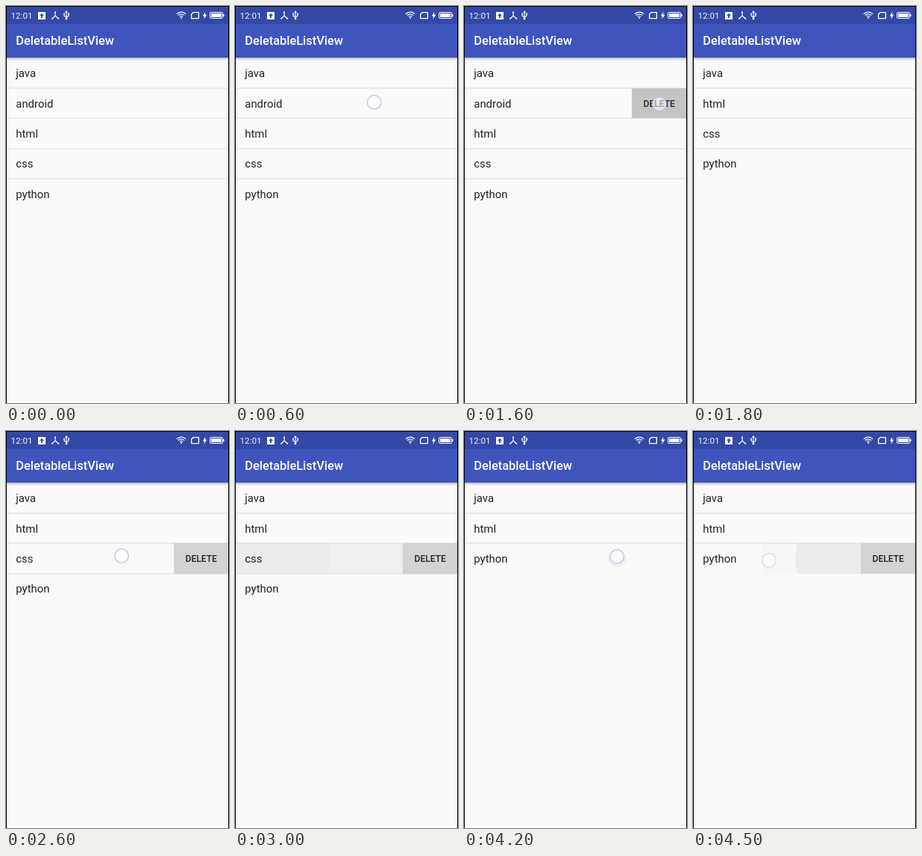
These frames come from a looping animation (299 by 531 pixels, 8 s). An HTML page with a canvas:

```html
<!DOCTYPE html>
<html lang="en">
<head>
<meta charset="utf-8">
<title>Deletable list</title>
<style>
html, body { margin: 0; width: 100%; height: 100%; overflow: hidden; background: #000; }
canvas { display: block; width: 299px; height: 531px; }
</style>
</head>
<body>
<canvas id="stage"></canvas>
<script>
const W = 299, H = 531, LOOP = 8000, STEP = 100;
const ROW_TOP = 69.3, ROW_H = 40.4, BUTTON_X = 225;
const BAR = '#3f55be', STATUS = '#3448a6', PAGE = '#fafafa', INK = '#222';

const canvas = document.getElementById('stage');
const ctx = canvas.getContext('2d');
const scale = window.devicePixelRatio || 1;
canvas.width = W * scale;
canvas.height = H * scale;

// Each swipe opens a button between two times; a press then removes the row.
const swipes = [
  { row: 1, start: 500, open: 700, end: 800, from: [205, 129], to: [150, 128], press: 1600 },
  { row: 2, start: 2400, open: 2600, end: 2800, from: [205, 165], to: [105, 169], press: 3300, hold: true },
  { row: 2, start: 4200, open: 4500, end: 8000, from: [205, 168], to: [102, 173], stop: 4500, ripple: true }
];

const rowTop = i => Math.round(ROW_TOP + i * ROW_H);
const clamp = v => Math.max(0, Math.min(1, v));
const mix = (a, b, k) => a + (b - a) * k;

function rect(x, y, w, h, fill) {
  ctx.fillStyle = fill;
  ctx.fillRect(x, y, w, h);
}

function text(str, x, y, size, weight, fill) {
  ctx.font = `${weight} ${size}px Roboto, sans-serif`;
  ctx.fillStyle = fill;
  ctx.fillText(str, x, y);
}

function path(points, close) {
  ctx.beginPath();
  points.forEach(([x, y], i) => i ? ctx.lineTo(x, y) : ctx.moveTo(x, y));
  if (close) ctx.closePath();
}

function stroke(points, width, close) {
  path(points, close);
  ctx.lineWidth = width;
  ctx.stroke();
}

function dot(x, y, r) {
  ctx.beginPath();
  ctx.arc(x, y, r, 0, Math.PI * 2);
  ctx.fill();
}

function statusIcons() {
  ctx.strokeStyle = ctx.fillStyle = '#fff';
  ctx.lineJoin = 'round';

  // Upload box
  ctx.fillRect(43, 8, 10, 10);
  ctx.fillStyle = STATUS;
  path([[48, 9.8], [51, 13], [49, 13], [49, 16], [47, 16], [47, 13], [45, 13]], true);
  ctx.fill();

  // Three-way link
  ctx.fillStyle = '#fff';
  stroke([[66, 8], [66, 13], [62, 17]], 1.2);
  stroke([[66, 13], [70.5, 17]], 1.2);
  dot(66, 8.3, 1);
  dot(62, 16.8, 1);
  dot(70.3, 16.8, 1);

  // USB
  stroke([[81, 8], [81, 17]], 1.2);
  stroke([[78, 10], [78, 13], [81, 15], [84, 13], [84, 10]], 1.1);
  path([[81, 6], [83, 9], [79, 9]], true);
  ctx.fill();
  dot(81, 17, 1.4);
  dot(78, 10.5, 1);
  ctx.fillRect(83, 9.5, 2, 2);

  // Wireless
  ctx.lineWidth = 1.2;
  for (const r of [3, 5.7, 8.4]) {
    ctx.beginPath();
    ctx.arc(235, 16.5, r, -Math.PI * 0.76, -Math.PI * 0.24);
    ctx.stroke();
  }
  dot(235, 16, 1.1);

  // Card, bolt, battery
  stroke([[251, 8.7], [258.4, 8.7], [258.4, 16.6], [248.6, 16.6], [248.6, 11]], 1.3, true);
  path([[267.5, 7.5], [263.8, 13.4], [266.2, 13.4], [265.2, 18], [269.4, 11.6], [266.9, 11.6]], true);
  ctx.fill();
  ctx.lineWidth = 1;
  ctx.beginPath();
  ctx.roundRect(273.5, 8.5, 17, 8, 1.5);
  ctx.stroke();
  ctx.fillRect(275, 10, 14, 5);
  ctx.fillRect(291, 11, 1.5, 3);
}

function header() {
  rect(1, 1, 297, 23, STATUS);
  rect(1, 24, 297, 45, BAR);
  const shade = ctx.createLinearGradient(0, 69, 0, 73);
  shade.addColorStop(0, 'rgba(0,0,0,.25)');
  shade.addColorStop(1, 'rgba(0,0,0,0)');
  rect(1, 69, 297, 4, shade);
  text('12:01', 6.5, 16.5, 11.7, 400, '#eef0fa');
  text('DeletableListView', 13.2, 52, 16.4, 500, '#fff');
  statusIcons();
}

function touch(x, y, pale) {
  ctx.beginPath();
  ctx.arc(x, y, 9.3, 0, Math.PI * 2);
  ctx.fillStyle = 'rgba(255,255,255,.55)';
  ctx.fill();
  ctx.strokeStyle = pale ? '#d9d9de' : '#c3c2ec';
  ctx.lineWidth = 1.3;
  ctx.stroke();
}

function rowTint(s, t) {
  const top = rowTop(s.row);
  const h = rowTop(s.row + 1) - top;
  if (s.hold && t >= 2700) {
    const k = clamp((t - 2600) / 400);
    rect(1, top, 126, h, `rgba(0,0,0,${0.054 * k})`);
    rect(127, top, BUTTON_X - 127, h, `rgba(0,0,0,${0.042 * k})`);
  }
  if (s.ripple) {
    const k = clamp((t - s.start) / 300);
    rect(93, top, BUTTON_X - 93, h, `rgba(0,0,0,${0.012 * k})`);
    ctx.save();
    ctx.beginPath();
    ctx.rect(1, top, 297, h);
    ctx.clip();
    ctx.fillStyle = 'rgba(0,0,0,.042)';
    dot(205, top + h / 2, mix(12, 68, k));
    ctx.restore();
  }
}

function deleteButton(row, pressed) {
  const top = rowTop(row);
  rect(BUTTON_X, top, 298 - BUTTON_X, rowTop(row + 1) - top, pressed ? '#c4c4c4' : '#d3d3d3');
  text('DELETE', 240.6, top + 25, 12, 500, INK);
}

function draw(t) {
  ctx.setTransform(scale, 0, 0, scale, 0, 0);
  rect(0, 0, W, H, '#000');
  rect(1, 1, 297, 530, PAGE);

  const items = ['java', 'android', 'html', 'css', 'python'];
  for (const s of swipes) if (t >= s.press + STEP) items.splice(s.row, 1);

  const active = swipes.find(s => t >= s.start && !(t >= s.press + STEP));
  if (active) rowTint(active, t);

  const line = t < 500 ? '#e2e2e2' : '#d9d9d9';
  items.forEach((name, i) => {
    if (i) rect(1, rowTop(i) - 0.5, 297, 1, line);
    text(name, 13.3, ROW_TOP + i * ROW_H + 25.8, 14.9, 400, INK);
  });

  if (active) {
    const { row, start, open, end, from, to, stop = end, press } = active;
    if (t >= open) deleteButton(row, t >= press);
    if (t < end) {
      const k = clamp((t - start) / (stop - start));
      touch(mix(from[0], to[0], k), mix(from[1], to[1], k), t >= 4500);
    }
    if (t >= press) touch(262, rowTop(row) + 21);
  }
  header();
}

function frame(now) {
  draw(Math.floor((now % LOOP) / STEP) * STEP);
  requestAnimationFrame(frame);
}
requestAnimationFrame(frame);
</script>
</body>
</html>
```
